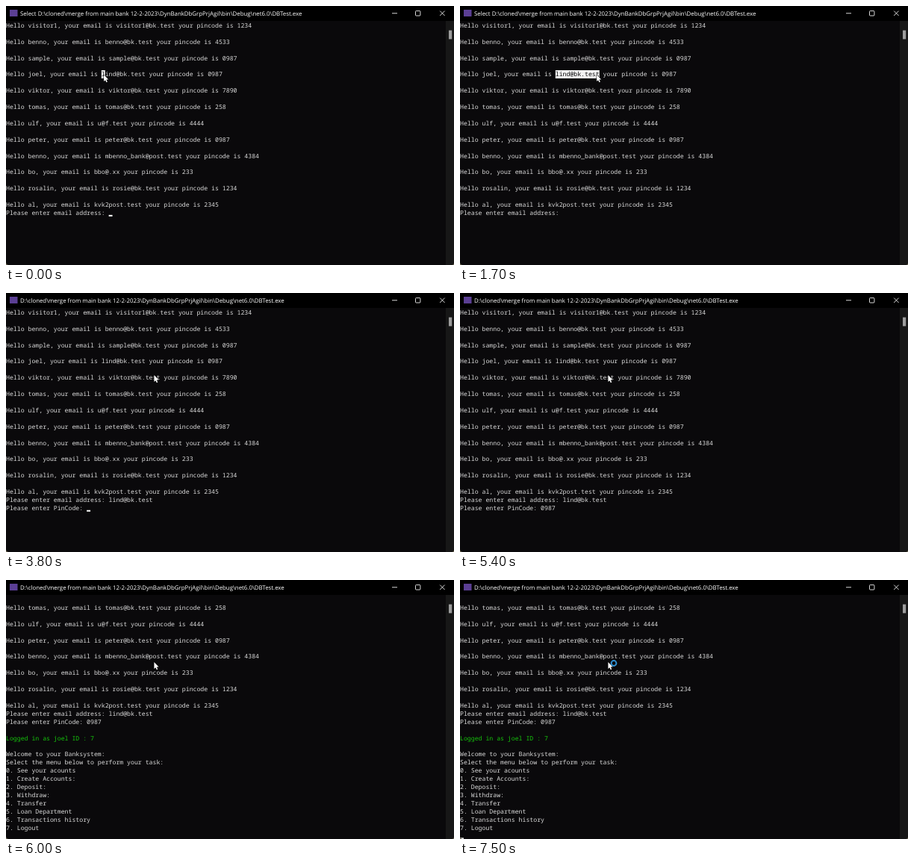
These frames come from a looping animation (600x347 px, 8000 ms). An HTML page with a canvas:

```html
<!DOCTYPE html>
<html lang="en">
<head>
<meta charset="utf-8">
<title>Console login</title>
<style>
  html, body { margin: 0; width: 100%; height: 100%; overflow: hidden; background: #0a090b; }
  canvas { display: block; }
</style>
</head>
<body>
<canvas id="stage" width="600" height="347"></canvas>
<script>
const ctx = document.getElementById('stage').getContext('2d');
const LOOP = 8000, STEP = 100;
const CELL_W = 4.915, CELL_H = 10.92, TOP = 20.5, COLS = 120;
const BACK = '#0a090b', INK = '#dadada', GREEN = '#16c60c', LIGHT = '#f2f2f2', DESKTOP = '#6b6450';
const MONO = '8.192px "Noto Sans Mono", monospace';
const SANS = '7.855px "Open Sans", sans-serif';
const PATH = 'D:\\cloned\\merge from main bank 12-2-2023\\DynBankDbGrpPrjAgil\\bin\\Debug\\net6.0\\DBTest.exe';

const users = [
  ['visitor1', 'visitor1@bk.test', '1234'],
  ['benno', 'benno@bk.test', '4533'],
  ['sample', 'sample@bk.test', '0987'],
  ['joel', 'lind@bk.test', '0987'],
  ['viktor', 'viktor@bk.test', '7890'],
  ['tomas', 'tomas@bk.test', '258'],
  ['ulf', 'u@f.test', '4444'],
  ['peter', 'peter@bk.test', '0987'],
  ['benno', 'mbenno_bank@post.test', '4384'],
  ['bo', 'bbo@.xx', '233'],
  ['rosalin', 'rosie@bk.test', '1234'],
  ['al', 'kvk2post.test', '2345']
];
const greetings = users.map(([name, mail, pin]) =>
  `Hello ${name}, your email is ${mail} your pincode is ${pin}`);

const menu = [
  'Welcome to your Banksystem:',
  'Select the menu below to perform your task:',
  '0. See your acounts',
  '1. Create Accounts:',
  '2. Deposit:',
  '3. Withdraw:',
  '4. Transfer',
  '5. Loan Department',
  '6. Transactions history',
  '7. Logout'
];

const PASTE = 2600, ENTER = 3800, UNSELECT = 1900, SHIFT = 5900, LOGIN = 6000, BUSY = 6700;
const keyTimes = [4300, 4500, 4800, 5100];
const ANCHOR = { row: 6, col: 26 };

// time, x, y of the pointer tip
const pointerPath = [
  [0, 131, 92], [400, 169, 85], [900, 195, 88], [1200, 192, 90], [1400, 192, 90],
  [1700, 183, 92], [1900, 183, 92], [2200, 183, 96], [3000, 183, 96], [3200, 198.4, 110]
];

// spans in which the text caret is lit
const caretOn = [
  [0, 500], [1000, 1500], [2100, 2800], [3100, 4300],
  [4500, 5400], [6100, 7000], [7500, 8000]
];

function pointerAt(t) {
  const i = pointerPath.findIndex(p => p[0] > t);
  if (i < 0) return pointerPath[pointerPath.length - 1].slice(1);
  const [t0, x0, y0] = pointerPath[i - 1], [t1, x1, y1] = pointerPath[i];
  const k = (t - t0) / (t1 - t0);
  return [x0 + (x1 - x0) * k, y0 + (y1 - y0) * k];
}

const rowTop = row => TOP + row * CELL_H;

function rect(color, x, y, w, h) {
  ctx.fillStyle = color;
  ctx.fillRect(x, y, w, h);
}

function printRow(text, row, color) {
  ctx.fillStyle = color;
  ctx.fillText(text, 0, rowTop(row) + 8.4);
}

function screenAt(t) {
  const typed = keyTimes.filter(k => t >= k).length;
  const lines = [];
  greetings.forEach((text, i) => { lines[i * 2] = text; });
  lines.push('Please enter email address: ' + (t >= PASTE ? users[3][1] : ''));
  if (t >= ENTER) lines.push('Please enter PinCode: ' + '0987'.slice(0, typed));

  let caret = [lines.length - 1, lines[lines.length - 1].length];
  if (t >= LOGIN) {
    lines.splice(0, 9);
    lines.push('', `Logged in as ${users[3][0]} ID : 7`, '', ...menu);
    caret = [lines.length, 0];
  } else if (t >= SHIFT) {
    lines.unshift(lines[0]);
  }
  return { lines, caret };
}

function printLines(lines, color) {
  ctx.font = MONO;
  lines.forEach((text, row) => {
    if (text) printRow(text, row, color || (text.startsWith('Logged') ? GREEN : INK));
  });
}

function drawSelection(lines, x, y) {
  const head = { row: Math.floor((y - TOP) / CELL_H), col: Math.floor(x / CELL_W) };
  const order = c => c.row * COLS + c.col;
  const [from, to] = [ANCHOR, head].sort((a, b) => order(a) - order(b));
  ctx.save();
  ctx.beginPath();
  for (let row = from.row; row <= to.row; row++) {
    const first = row === from.row ? from.col : 0;
    const last = row === to.row ? to.col + 1 : COLS;
    ctx.rect(first * CELL_W, rowTop(row), (last - first) * CELL_W, CELL_H);
  }
  ctx.fillStyle = LIGHT;
  ctx.fill();
  ctx.clip();
  printLines(lines, BACK);
  ctx.restore();
}

function drawFrame(selecting) {
  rect('#000', 0, 0, 600, 20);
  rect('#5b3f94', 5, 5, 10.5, 9);
  ctx.font = SANS;
  ctx.fillStyle = '#fff';
  ctx.fillText((selecting ? 'Select ' : '') + PATH, 19, 13);

  ctx.strokeStyle = '#f0f0f0';
  ctx.lineWidth = 0.9;
  ctx.beginPath();
  ctx.moveTo(517, 9.8);
  ctx.lineTo(524, 9.8);
  ctx.roundRect(548.5, 6.6, 6.4, 6.4, 0.8);
  ctx.moveTo(581.2, 6.6);
  ctx.lineTo(587.6, 13);
  ctx.moveTo(587.6, 6.6);
  ctx.lineTo(581.2, 13);
  ctx.stroke();

  rect('#171717', 589, 20, 11, 327);
  rect('#9d9d9d', 593, 32.6, 4.2, 11.8);
}

function drawPointer(x, y) {
  ctx.save();
  ctx.translate(x, y);
  ctx.beginPath();
  [[0, 0], [0, 9], [2, 7.2], [3.4, 10.3], [4.8, 9.7], [3.5, 6.6], [6.2, 6.6]]
    .forEach(p => ctx.lineTo(...p));
  ctx.closePath();
  ctx.lineJoin = 'round';
  ctx.lineWidth = 1;
  ctx.strokeStyle = '#000';
  ctx.stroke();
  ctx.fillStyle = '#fff';
  ctx.fill();
  ctx.restore();
}

function drawBusyRing() {
  ctx.beginPath();
  ctx.arc(206, 111.5, 3.4, 0, Math.PI * 2);
  ctx.lineWidth = 2;
  ctx.strokeStyle = '#2f8fd0';
  ctx.stroke();
}

function draw(t) {
  const selecting = t < UNSELECT;
  const { lines, caret: [row, col] } = screenAt(t);
  const [x, y] = pointerAt(t);
  ctx.textRendering = 'geometricPrecision';

  // the window's lower corners are rounded
  rect(DESKTOP, 0, 0, 600, 347);
  ctx.save();
  ctx.beginPath();
  ctx.roundRect(0, 0, 600, 347, [0, 0, 4, 4]);
  ctx.clip();

  rect(BACK, 0, 0, 600, 347);
  printLines(lines);
  if (selecting) drawSelection(lines, x, y);
  if (caretOn.some(([a, b]) => t >= a && t < b)) {
    rect(LIGHT, col * CELL_W, rowTop(row) + 8.2, CELL_W, 2.1);
  }
  drawFrame(selecting);
  ctx.restore();

  drawPointer(x, y);
  if (t >= BUSY) drawBusyRing();
}

function tick() {
  const t = performance.now() % LOOP;
  draw(Math.floor(t / STEP) * STEP);
  requestAnimationFrame(tick);
}
tick();
</script>
</body>
</html>
```
